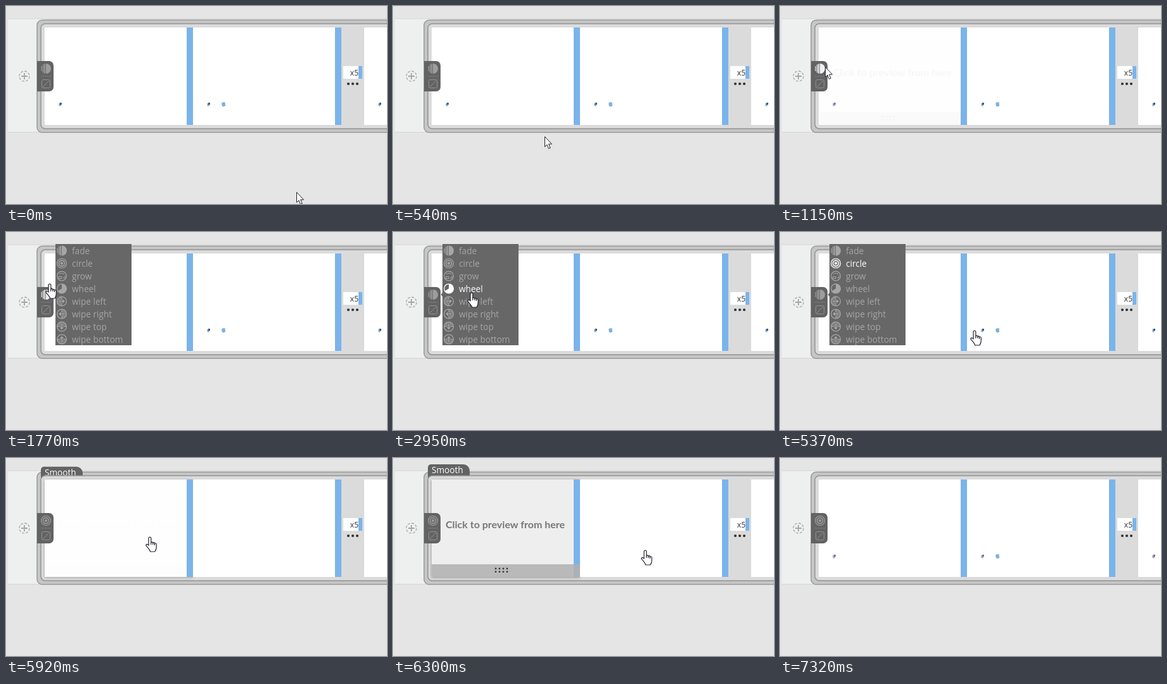
Animation, 601 px wide and 313 px high, one loop 8.12 s. Source, as an HTML page:

```html
<!DOCTYPE html>
<html lang="en">
<head>
<meta charset="utf-8">
<title>Choosing a slide transition</title>
<style>
  html, body { margin: 0; width: 100%; height: 100%; overflow: hidden; background: #e5e5e5; }
  svg { display: block; width: 601px; height: 313px; }
  text { font: 500 13.6px "Open Sans", "Noto Sans", sans-serif; }
  .count { font-size: 12px; font-weight: 400; fill: #333; text-anchor: end; }
  .hint { font: bold 16px Lato, sans-serif; fill: #777; text-anchor: middle; }
  .glyph { fill: none; stroke: currentColor; stroke-width: 1.2; }
  .glyph .solid { fill: currentColor; stroke: none; }
  #lift { filter: drop-shadow(0 1.5px 2px rgba(0, 0, 0, .33)); }
</style>
</head>
<body>
<svg viewBox="0 0 601 313">
  <defs>
    <g id="g-fade" class="glyph">
      <path class="solid" d="M0-8A8 8 0 0 1 0 8Z"/>
      <path d="M-1.8-7.6V7.6" stroke-width="1.8"/>
      <path d="M-4.3-6.6V6.6" stroke-width="1.4"/>
      <path d="M-6.8-4V4"/>
    </g>
    <g id="g-circle" class="glyph">
      <circle r="7.5" fill="currentColor" fill-opacity=".15"/>
      <circle r="4.5" stroke-width="1.4"/>
      <circle r="2" class="solid"/>
    </g>
    <g id="g-grow" class="glyph">
      <circle r="7.4"/>
      <path d="M-4-3Q0-6 4-3M-4.5 1V4H0V1ZM2 3H5V-1" stroke-width="1"/>
    </g>
    <g id="g-wheel" class="glyph">
      <circle r="7.4"/>
      <path class="solid" d="M0 0V-7.4A7.4 7.4 0 1 1-6.4 3.7Z"/>
    </g>
    <g id="g-wipe" class="glyph">
      <circle r="7.4"/>
      <path class="solid" fill-opacity=".45" d="M0-7.4A7.4 7.4 0 0 0 0 7.4Z"/>
      <path d="M0-7V-3M0 3V7M-4 0H2"/>
      <path class="solid" d="M1-3.2L5 0L1 3.2Z"/>
    </g>
    <g id="speck">
      <path d="M-2.5-1L0-3L2.5-2L1.5 1.5L-.5 3.2L-2 2Z" fill="#84aed6"/>
      <path d="M0-2.8L2.3-2.6L2 .5L-.4 .8Z" fill="currentColor"/>
    </g>
  </defs>

  <rect x="3" y="20" width="60" height="179.5" fill="#edf0ee"/>
  <path d="M3 20H601M3 199.5H60" stroke="#d3d5d4" stroke-width="1.2"/>
  <g fill="none" stroke="#a6a6a6">
    <circle cx="29" cy="111" r="8" stroke-width="1.3" stroke-dasharray="4 2.28"/>
    <path d="M24 111H34M29 106V116" stroke-width="1.8"/>
  </g>

  <rect x="49" y="22.2" width="600" height="177.6" rx="8" fill="#c6c6c6" stroke="#999" stroke-width="1.5"/>
  <g id="tab">
    <path d="M55 24V5A5 5 0 0 1 60 0H111A10 10 0 0 1 121 10V24Z" fill="#636363"/>
    <text x="61" y="14" fill="#fff">Smooth</text>
  </g>
  <rect x="55" y="28" width="600" height="166" rx="7" fill="#dbdbdb" stroke="#929292" stroke-width="1.5"/>

  <rect id="lift" x="61" y="34" width="234" height="154" fill="#fff"/>
  <path d="M61 34H285V188H61ZM295 34H519V188H295ZM565 34H601V188H565ZM532 95H556V115H532Z" fill="#fff"/>
  <path d="M285 34H295V188H285ZM519 34H529V188H519ZM556 95H562V115H556Z" fill="#7ab4eb"/>
  <text class="count" x="556" y="110">x5</text>
  <path d="M540 123H555" stroke="#333" stroke-width="4.2" stroke-linecap="round" stroke-dasharray="0 7"/>

  <g id="specks">
    <use id="firstSpeck" href="#speck" x="85.5" y="155.5"/>
    <g id="otherSpecks">
      <use href="#speck" x="319.5" y="155.5"/>
      <use href="#speck" x="589.5" y="155.5"/>
    </g>
    <path d="M340 154L342 152L346 152.5L345.5 155L346.5 157L344 159L341 158.5Z" fill="#7db0dc"/>
  </g>

  <g id="overlay">
    <rect x="61" y="34" width="224" height="154" fill="#eee"/>
    <rect x="61" y="168" width="234" height="20" fill="#b1b1b1" opacity=".87"/>
    <path d="M162 174.8H181M162 179.8H181" stroke="#333" stroke-width="2.8" stroke-linecap="round" stroke-dasharray="0 6"/>
    <text class="hint" x="177" y="111">Click to preview from here</text>
  </g>

  <path d="M49 87H68A7 7 0 0 1 75 94V128A7 7 0 0 1 68 135H49Z" fill="#636363"/>
  <path d="M55 111H71" stroke="#7c7c7c"/>
  <g fill="none" stroke="#919191"><rect x="56.5" y="116.5" width="13" height="13" rx="2"/><path d="M58 128L68 118"/></g>
  <use id="current" x="63" y="99"/>

  <g id="menu">
    <path d="M78 19H198V179H78V102L75.5 99L78 96Z" fill="#676767"/>
  </g>

  <g stroke-linejoin="round" fill="#fff" stroke="#22202c">
    <path id="arrow" d="M.5 .5V16.5L4 13.2L6.5 19.5L9.2 18.3L6.6 12.2H11.5Z"/>
    <g id="hand" stroke-width="1.2">
      <path d="M0 12V1.2Q0-1 1.9-1T3.8 1.2V7.2Q6.3 6.2 6.8 7.9Q9 7 9.4 8.8Q12.2 8.4 12.2 10.8V15Q12.2 18.5 9.9 22H2.6Q1.5 18.5-3.6 13.2Q-4.7 11.4-3.4 10.6Q-1.8 10 0 12Z"/>
      <path d="M3.8 7V11M6.8 8V11M9.4 9V12" fill="none"/>
    </g>
  </g>
</svg>

<script>
const LOOP = 8120;
const STEP = 78;          // screen refresh while something moves
const FADE = 300;
const MENU_OPEN = 1770, MENU_CLOSE = 5680, REDRAWN = 6380;
const SVG = "http://www.w3.org/2000/svg";
const $ = id => document.getElementById(id);

// Pointer strokes; the screen stands still between them.
const strokes = [
  { from: 0, to: 0, x: 458, y: 294 },
  { from: 70, to: 460, x: 262, y: 225 },
  { from: 540, to: 840, x: 145, y: 130 },
  { from: 920, to: 1150, x: 71, y: 96 },
  { from: 1225, to: 1300, x: 67, y: 84 },
  { from: MENU_OPEN, to: MENU_OPEN, x: 67, y: 83 },
  { from: 2480, to: 2950, x: 122, y: 97 },
  { from: 3030, to: 3280, x: 129, y: 79 },
  { from: 3340, to: 3740, x: 124, y: 42 },
  { from: 4040, to: 4210, x: 131, y: 51 },
  { from: 4360, to: 4440, x: 145, y: 52 },
  { from: 4515, to: 4820, x: 213, y: 65 },
  { from: 4990, to: 5450, x: 320, y: 172 },
  { from: MENU_CLOSE, to: 5920, x: 225, y: 126 },
  { from: 6000, to: 6300, x: 396, y: 147 },
  { from: REDRAWN, to: 6470, x: 480, y: 232 },
  { from: 6540, to: 7320, x: 568, y: 316 }
];

// Times at which the first slide is hovered.
const hovers = [{ enter: 560, leave: 840 }, { enter: 5758, leave: 6470 }];

const items = ["fade", "circle", "grow", "wheel", "wipe left", "wipe right", "wipe top", "wipe bottom"];
const turns = { left: 0, right: 180, top: 90, bottom: -90 };

function add(parent, tag, attrs, text = "") {
  const node = document.createElementNS(SVG, tag);
  for (const key in attrs) node.setAttribute(key, attrs[key]);
  node.textContent = text;
  return parent.appendChild(node);
}

const rows = items.map((label, i) => {
  const [glyph, side = "left"] = label.split(" ");
  const y = 29.5 + 20 * i;
  const row = add($("menu"), "g", { fill: "currentColor" });
  add(row, "use", { href: "#g-" + glyph, transform: `translate(88 ${y}) rotate(${turns[side]})` });
  add(row, "text", { x: 104, y: y + 5.5 }, label);
  return row;
});

// Last refreshed moment and the pointer position it shows.
function screenAt(time) {
  const now = time + 5;
  const i = strokes.findLastIndex(stroke => stroke.from <= now);
  const { from, to, x, y } = strokes[i];
  const start = strokes[Math.max(0, i - 1)];
  const gaps = Math.round((to - from) / STEP);
  const gap = (to - from) / gaps || 1;
  const step = Math.min(gaps, Math.floor((now - from) / gap));
  const u = (step + 1) / (gaps + 1);
  return {
    t: from + step * gap,
    x: Math.round(start.x + (x - start.x) * u),
    y: Math.round(start.y + (y - start.y) * u)
  };
}

function easeOut(elapsed) {
  const u = Math.max(0, Math.min(1, elapsed / FADE));
  return 1 - (1 - u) ** 2;
}

function hoverLevel(t, enterDelay, leaveDelay) {
  return hovers.reduce((sum, { enter, leave }) =>
    sum + easeOut(t - enter - enterDelay) * (1 - easeOut(t - leave - leaveDelay)), 0);
}

const show = (node, on) => node.setAttribute("visibility", on ? "visible" : "hidden");
const speckColor = red => red ? "#c8475c" : "#3a4664";

function render(time) {
  const { t, x, y } = screenAt(time);
  const tab = hoverLevel(t, 0, 0);

  show($("tab"), tab > 0);
  $("tab").setAttribute("transform", `translate(0 ${28 - 18 * tab})`);
  $("lift").setAttribute("opacity", tab);
  $("overlay").setAttribute("opacity", hoverLevel(t, 160, 80));

  show($("specks"), t < MENU_CLOSE || t >= REDRAWN);
  $("firstSpeck").style.color = speckColor(t > 1000);
  $("otherSpecks").style.color = speckColor(t >= REDRAWN);

  const onIcon = x > 54 && x < 77;
  $("current").setAttribute("href", t < MENU_CLOSE ? "#g-fade" : "#g-circle");
  $("current").style.color = onIcon ? "#f0f0f0" : "#9d9d9d";

  show($("menu"), t >= MENU_OPEN && t < MENU_CLOSE);
  const chosen = t > 3700;
  const active = chosen ? 1 : x > 80 ? Math.min(3, Math.floor((y - 18) / 20)) : -1;
  rows.forEach((row, i) => row.style.color = i === active ? "#fff" : "#a6a6a6");

  const isHand = t >= MENU_OPEN ? t < REDRAWN : y < 188 && x > 80;
  show($("hand"), isHand);
  show($("arrow"), !isHand);
  $(isHand ? "hand" : "arrow").setAttribute("transform", `translate(${x} ${y})`);
}

const began = performance.now();
function tick() {
  render((performance.now() - began) % LOOP);
  requestAnimationFrame(tick);
}
tick();
</script>
</body>
</html>
```
